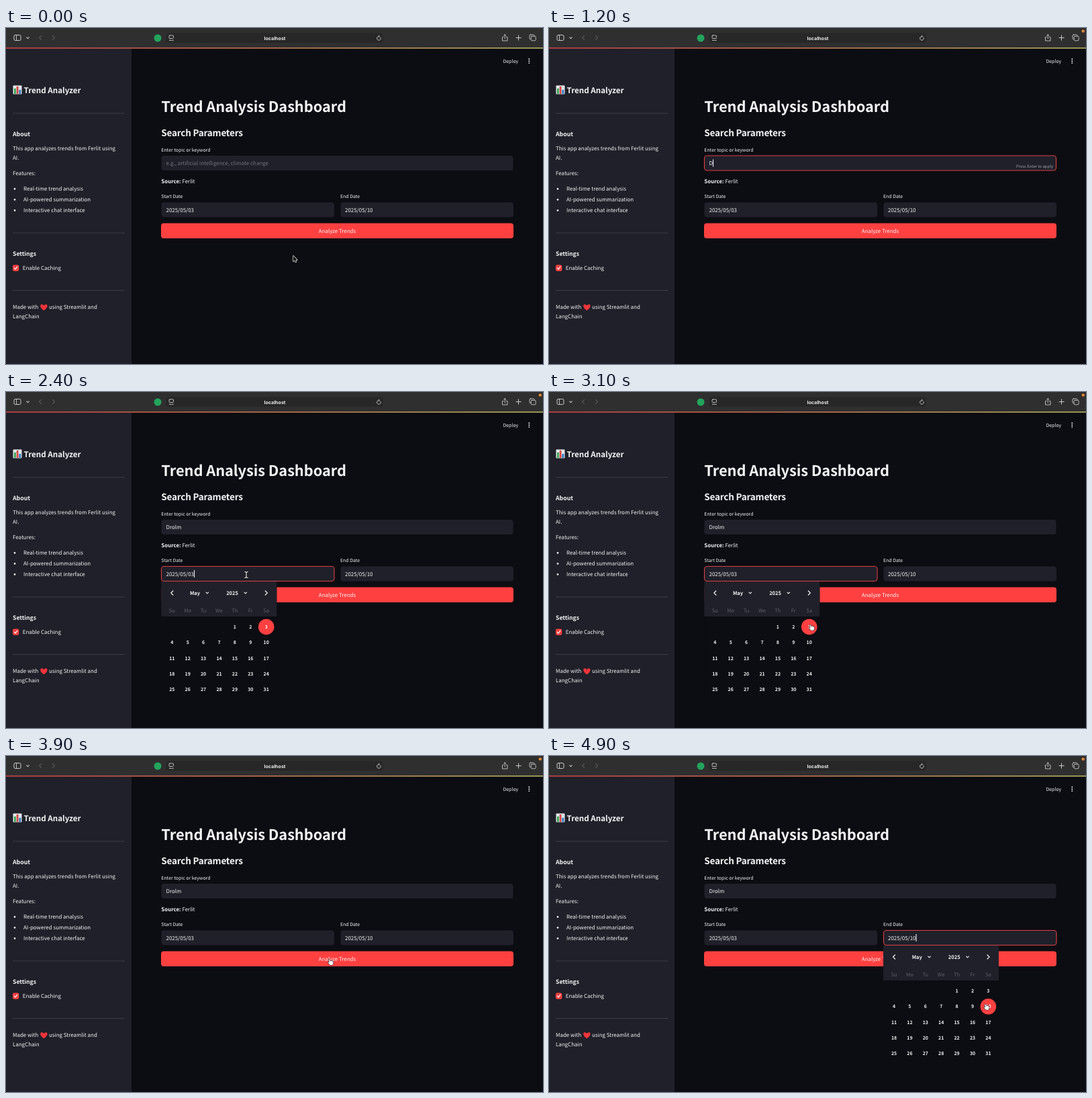
Animation of 800 by 500 pixels, one loop 5000 ms. Source, as an HTML page with a canvas:

```html
<!DOCTYPE html>
<html lang="en">
<head>
<meta charset="utf-8">
<title>Trend Analysis Dashboard</title>
<style>
html, body { margin: 0; width: 100%; height: 100%; overflow: hidden; background: #0c0d12; }
canvas { display: block; width: 800px; height: 500px; }
</style>
</head>
<body>
<canvas id="stage"></canvas>
<script>
const LOOP = 5000, STEP = 100;
const SANS = '"Noto Sans CJK JP", "Noto Sans CJK SC", "Noto Sans CJK", "Open Sans", sans-serif';
const UI = 'Inter, Roboto, sans-serif';
const C = {
  page: '#0c0d12', panel: '#20202a', bar: '#2f2f30', field: '#272728', rule: '#3c3c46',
  text: '#f4f4f6', dim: '#73747c', hint: '#a3a4ab', red: '#ff4040', icon: '#c9c9ca', off: '#57575a'
};
const BODY = 7.95, SMALL = 6.95;
const KEYWORD = 'Drolm', SITE = 'Ferlit';
const KEYWORD_BOX = [231.5, 190, 524, 22];
const START_BOX = [231.5, 259.5, 257.5, 22];
const END_BOX = [498.5, 259.5, 257.5, 22];

const canvas = document.getElementById('stage');
const dpr = window.devicePixelRatio || 1;
canvas.width = 800 * dpr;
canvas.height = 500 * dpr;
const ctx = canvas.getContext('2d');
ctx.scale(dpr, dpr);
ctx.textRendering = 'geometricPrecision';

// Pointer stops: arrival after a move that begins at "from".
const moves = [
  { from: 100, to: 600, x: 473, y: 204 },
  { from: 1900, to: 2250, x: 358, y: 272 },
  { from: 2450, to: 2950, x: 391, y: 350 },
  { from: 3600, to: 4150, x: 553.5, y: 273 },
  { from: 4300, to: 4800, x: 651.5, y: 373 }
];

function rect(x, y, w, h, color) {
  ctx.fillStyle = color;
  ctx.fillRect(x, y, w, h);
}

function box([x, y, w, h], fill, stroke, r = 4, lw = 1) {
  ctx.beginPath();
  ctx.roundRect(x, y, w, h, r);
  if (fill) { ctx.fillStyle = fill; ctx.fill(); }
  if (stroke) { ctx.strokeStyle = stroke; ctx.lineWidth = lw; ctx.stroke(); }
}

function disc(x, y, r, color) {
  ctx.beginPath();
  ctx.arc(x, y, r, 0, Math.PI * 2);
  ctx.fillStyle = color;
  ctx.fill();
}

function line(points, color, lw = 1) {
  ctx.beginPath();
  for (let i = 0; i < points.length; i += 2) ctx.lineTo(points[i], points[i + 1]);
  ctx.strokeStyle = color;
  ctx.lineWidth = lw;
  ctx.lineCap = ctx.lineJoin = 'round';
  ctx.stroke();
}

// y is the middle of the capitals; returns the right edge of the text.
function text(str, x, y, { size = BODY, bold = false, color = C.text, align = 'left', font = SANS, gap = 0 } = {}) {
  ctx.font = `${bold ? 700 : 400} ${size}px ${font}`;
  ctx.letterSpacing = gap + 'px';
  ctx.textAlign = align;
  ctx.textBaseline = 'alphabetic';
  ctx.fillStyle = color;
  ctx.fillText(str, x, y + size * 0.365);
  return x + ctx.measureText(str).width;
}

function chevron(x, y, dx, dy, color, lw = 1.1) {
  const pts = dx ? [x - dx, y - 3, x + dx, y, x - dx, y + 3]
                 : [x - 1.8, y - dy, x, y + dy, x + 1.8, y - dy];
  line(pts, color, lw);
}

function toolbar(t) {
  rect(0, 0, 800, 30, C.bar);
  box([12, 10.5, 10, 8], null, C.icon, 1.6);
  line([15.5, 10.5, 15.5, 18.5], C.icon, 0.9);
  chevron(32.5, 14.8, 0, 0.9, C.icon, 1.1);
  chevron(51, 14.5, -1.6, 0, C.off);
  chevron(71, 14.5, 1.6, 0, C.off);
  disc(226, 15, 5.5, '#23a45c');

  box([238, 7, 324, 15.5], C.field, '#353536', 4, 0.6);
  box([243, 11, 6.5, 4.5], null, C.icon, 1, 0.9);
  line([243, 18.3, 249.5, 18.3], C.icon, 0.9);
  text('localhost', 400.5, 15, { size: 7.1, bold: true, color: '#ececec', align: 'center', font: UI });
  ctx.beginPath();
  ctx.arc(555.5, 15.3, 2.9, -0.4, 4.7);
  ctx.strokeStyle = C.icon;
  ctx.lineWidth = 0.9;
  ctx.stroke();
  line([555, 10.8, 556.7, 12.4, 555, 13.8], C.icon, 0.8);

  line([741, 13.5, 739.5, 13.5, 739.5, 19, 747, 19, 747, 13.5, 745.5, 13.5], C.icon, 0.9);
  line([743.2, 16, 743.2, 9.8], C.icon, 0.9);
  line([741.5, 11.3, 743.2, 9.6, 744.9, 11.3], C.icon, 0.9);
  line([759.8, 14.5, 767.2, 14.5], C.icon);
  line([763.5, 10.8, 763.5, 18.2], C.icon);
  box([780, 10, 7, 6.5], null, C.icon, 1.3, 0.9);
  box([782.2, 12.3, 7, 6.5], C.bar, C.icon, 1.3, 0.9);
  if (t >= 200) disc(795.8, 4.6, 2.2, '#f08a33');

  const g = ctx.createLinearGradient(0, 0, 800, 0);
  g.addColorStop(0, '#e5484a');
  g.addColorStop(0.5, '#dc8552');
  g.addColorStop(1, '#c9c968');
  rect(0, 29.2, 800, 1.4, g);
}

function heart(x, y) {
  ctx.beginPath();
  ctx.moveTo(x, y + 4.8);
  ctx.bezierCurveTo(x - 9, y - 1, x - 4.5, y - 7.5, x, y - 2.6);
  ctx.bezierCurveTo(x + 4.5, y - 7.5, x + 9, y - 1, x, y + 4.8);
  ctx.fillStyle = '#f0353b';
  ctx.fill();
}

function sidebar() {
  rect(0, 30.6, 187, 470, C.panel);
  box([10.5, 85.5, 13, 13], '#dfe5e8', null, 1);
  rect(12, 90, 2.8, 8, '#3aa655');
  rect(15.7, 87, 2.8, 11, '#d8483f');
  rect(19.4, 92, 2.8, 6, '#3579c6');
  text('Trend Analyzer', 26.5, 92.5, { size: 11.6, bold: true });

  for (const y of [127, 305, 390.5]) rect(10, y - 0.5, 167, 1, C.rule);

  text('About', 10, 158, { size: 8.75, bold: true });
  text(`This app analyzes trends from ${SITE} using`, 10, 179.5);
  text('AI.', 10, 193.5);
  text('Features:', 10, 216);
  ['Real-time trend analysis', 'AI-powered summarization', 'Interactive chat interface'].forEach((s, i) => {
    const y = 239 + i * 16;
    disc(13, y + 0.4, 1.3, C.text);
    text(s, 26, y);
  });

  text('Settings', 10, 336, { size: 8.65, bold: true });
  box([10, 352.5, 9.2, 9.2], C.red, null, 2);
  line([12.3, 357.2, 14, 359, 17, 355.2], '#fff', 1.2);
  text('Enable Caching', 24.7, 357.3);

  text('Made with', 10, 415.5);
  heart(56.4, 415.5);
  text('using Streamlit and', 64, 415.5);
  text('LangChain', 10, 429.5);
}

function caret(x, y) {
  rect(x, y - 5.5, 1.1, 11, '#eef0fa');
}

function field(rc, edge) {
  box(rc, C.panel, edge, 4, 1.1);
}

function form(s) {
  text('Deploy', 740.5, 49.5, { size: SMALL, bold: false });
  for (const y of [46.3, 49.2, 52.1]) disc(779.3, y, 0.95, C.text);

  text('Trend Analysis Dashboard', 231.3, 117, { size: 21.8, bold: true, gap: -0.08 });
  text('Search Parameters', 231.3, 156.5, { size: 13.5, bold: true, gap: -0.2 });
  text('Enter topic or keyword', 231.3, 181, { size: SMALL });

  field(KEYWORD_BOX, s.focus === 'keyword' ? '#dd3f42' : null);
  let end = 238.5;
  if (s.typed) end = text(s.typed, 238.5, 201.3);
  else text('e.g., artificial intelligence, climate change', 238.5, 201.3, { color: C.dim });
  if (s.focus === 'keyword') {
    caret(end, 201);
    if (s.typed) text('Press Enter to apply', 751, 206, { size: 5.96, color: C.hint, align: 'right' });
  }

  const x = text('Source:', 231.3, 228, { size: 7.9, bold: true });
  text(SITE, x + 1.8, 228);

  text('Start Date', 231.3, 250.5, { size: SMALL });
  field(START_BOX, s.focus === 'start' ? '#dd3f42' : s.fade ? '#6d2c35' : null);
  end = text('2025/05/03', 238.5, 270.7);
  if (s.focus === 'start' && s.startCaret) caret(end, 270.5);

  text('End Date', 498, 250.5, { size: SMALL });
  field(END_BOX, s.focus === 'end' ? '#dd3f42' : null);
  end = text('2025/05/10', 505, 270.7);
  if (s.focus === 'end' && s.endCaret) caret(end, 270.5);

  box([231, 290.5, 525, 22.5], C.red, null, 4);
  text('Analyze Trends', 493.5, 301.8, { align: 'center' });
}

function calendar(left, picked) {
  rect(left, 282, 172, 172, C.page);
  rect(left, 282, 172, 52, C.panel);
  chevron(left + 16, 299, -1.5, 0, C.text, 1.2);
  chevron(left + 156.5, 299, 1.5, 0, C.text, 1.2);
  text('May', left + 50.2, 299, { size: 7.5, bold: true, align: 'center' });
  chevron(left + 68.5, 299, 0, 0.9, C.text);
  text('2025', left + 105.7, 299, { size: 7.5, bold: true, align: 'center' });
  chevron(left + 125.5, 299, 0, 0.9, C.text);

  const col = i => left + 16 + i * 23.4;
  ['Su', 'Mo', 'Tu', 'We', 'Th', 'Fr', 'Sa'].forEach((d, i) =>
    text(d, col(i), 325.7, { size: 7.6, color: '#5d5e68', align: 'center' }));
  for (let day = 1; day <= 31; day++) {
    const cell = day + 3, x = col(cell % 7), y = 349.5 + Math.floor(cell / 7) * 23.3;
    if (day === picked) disc(x, y, 11.8, C.red);
    text(String(day), x, y, { size: SMALL, bold: true, align: 'center' });
  }
}

function pointerAt(t) {
  let p = { x: 428, y: 339 };
  for (const m of moves) {
    const u = Math.min(1, Math.max(0, (t - m.from) / (m.to - m.from)));
    const k = u * u * (3 - 2 * u);
    p = { x: p.x + (m.x - p.x) * k, y: p.y + (m.y - p.y) * k };
  }
  return p;
}

const inside = (p, [x, y, w, h]) => p.x >= x && p.x <= x + w && p.y >= y && p.y <= y + h;

function shape(points, x, y, fill, edge, lw) {
  ctx.beginPath();
  for (let i = 0; i < points.length; i += 2) ctx.lineTo(x + points[i], y + points[i + 1]);
  ctx.closePath();
  ctx.lineJoin = 'round';
  ctx.strokeStyle = edge;
  ctx.lineWidth = lw;
  ctx.stroke();
  ctx.fillStyle = fill;
  ctx.fill();
}

function ibeam(x, y) {
  for (const [color, lw] of [['#15151b', 2.4], ['#f2f2f2', 1.1]]) {
    line([x - 2.2, y - 4.6, x, y - 3.8, x + 2.2, y - 4.6], color, lw);
    line([x, y - 3.8, x, y + 3.8], color, lw);
    line([x - 2.2, y + 4.6, x, y + 3.8, x + 2.2, y + 4.6], color, lw);
  }
}

function pointer(t, s) {
  if (t >= 1200 && t < 1900) return;
  const p = pointerAt(t);
  if ([KEYWORD_BOX, START_BOX, END_BOX].some(b => inside(p, b))) {
    ibeam(p.x, p.y);
  } else if (s.focus === 'start' || s.focus === 'end' || s.fade || inside(p, [231, 290, 525, 23])) {
    shape([-3, -4, -2, -4.2, -0.8, -1.6, 0.6, -2, 2, -1.6, 3.6, -0.8, 3.8, 1.4, 2.8, 4.2, -1, 4.2, -3.8, 1, -3.6, 0.2, -2, 0.6],
      p.x + 0.4, p.y + 0.5, '#f7f7f7', '#26262c', 1.2);
  } else {
    shape([0, 0, 0, 8.2, 1.9, 6.5, 3.2, 9.4, 4.6, 8.8, 3.3, 6, 5.8, 6],
      p.x, p.y, '#111', '#ececec', 1.4);
  }
}

function stateAt(t) {
  const count = Math.max(0, Math.min(KEYWORD.length, Math.floor((t - 1100) / 100)));
  let focus = null;
  if (t >= 600 && t < 2300) focus = 'keyword';
  else if (t >= 2300 && t < 3400) focus = 'start';
  else if (t >= 4200) focus = 'end';
  return {
    focus,
    typed: KEYWORD.slice(0, count),
    fade: t >= 3400 && t < 3700,
    startCaret: (t - 2300) % 1000 < 500,
    endCaret: t >= 4900
  };
}

function draw(t) {
  const s = stateAt(t);
  rect(0, 0, 800, 500, C.page);
  sidebar();
  toolbar(t);
  form(s);
  if (s.focus === 'start') calendar(231.3, 3);
  if (s.focus === 'end') calendar(498, 10);
  pointer(t, s);
}

const begin = performance.now();
function tick() {
  const t = (performance.now() - begin) % LOOP;
  draw(Math.floor(t / STEP) * STEP);
  requestAnimationFrame(tick);
}
tick();
</script>
</body>
</html>
```
